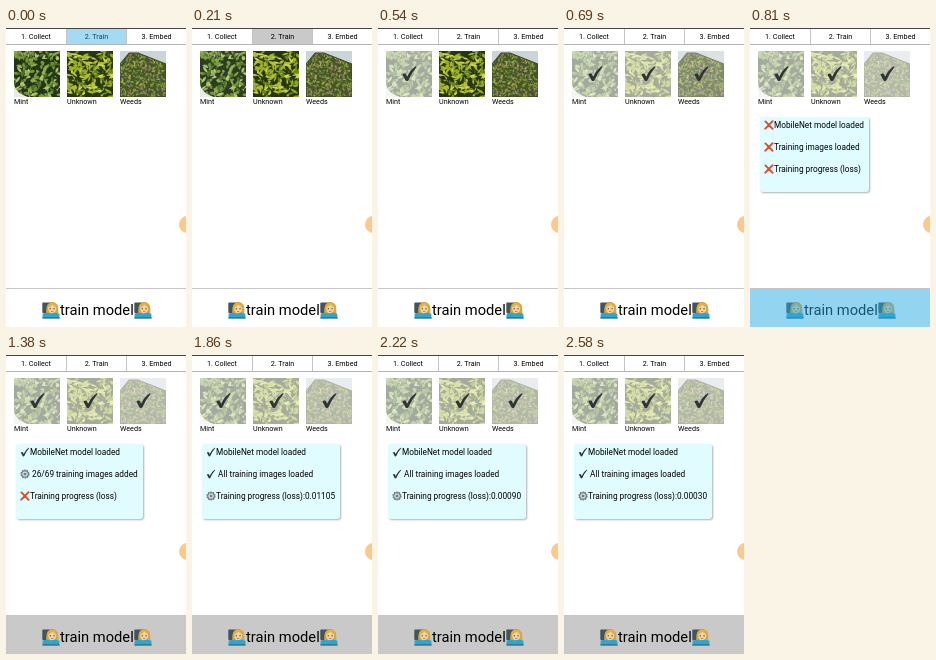
These frames come from a looping animation (180 by 299 pixels, 2610 ms). An HTML page with a canvas:

```html
<!DOCTYPE html>
<html lang="en">
<head>
<meta charset="utf-8">
<title>Train a model</title>
<style>
  @property --picked { syntax: '<number>'; inherits: true; initial-value: 0; }
  html, body { margin: 0; width: 100%; height: 100%; overflow: hidden; background: #fff; }
  body { position: relative; font: 7.2px Roboto, sans-serif; color: #000; }
  body > *, .thumb > *, .train > * { position: absolute; }
  .tabs { left: 0; top: 0; width: 180px; height: 15px; display: flex; border: solid #b4b4b4; border-width: 0 0 1px; border-top: 1px solid #444; }
  .tabs div { position: relative; width: 60px; box-sizing: border-box; line-height: 15px; text-align: center; }
  .tabs div + div { border-left: 1px solid #c4c4c4; }
  .tap { position: absolute; inset: 0; background: rgba(40, 170, 225, .42); }
  .thumb { top: 23px; width: 46px; height: 46px; }
  .thumb span { top: 46px; line-height: 9px; white-space: nowrap; }
  .veil { inset: 0; background: rgba(255, 255, 255, calc(.58 * var(--picked) * var(--picked))); }
  .veil svg { position: absolute; left: 15px; top: 14px; width: 17px; height: 17px; opacity: calc(1.8 * var(--picked)); }
  .panel { left: 10px; top: 89px; height: 75px; padding: 0 5px 0 4px; border-radius: 3px; background: #e0fcff; box-shadow: 1px 1px 2px #a9b4b6; font-size: 8.27px; }
  .row { display: flex; align-items: center; height: 22px; white-space: pre; }
  .row:first-child { margin-top: -3px; }
  .row svg { width: 10px; height: 10px; flex: none; }
  .train { left: 0; top: 260px; width: 180px; height: 38px; border-top: 1px solid #c6c6c6; overflow: hidden; font-size: 14.7px; line-height: 42px; }
  .train span { left: 54px; white-space: nowrap; }
  .train svg { top: 12px; width: 18px; height: 18px; }
  .train .tap { background: rgba(40, 170, 225, .5); }
  .bubble { left: 173px; top: 188px; width: 17px; height: 17px; border-radius: 50%; background: #fbc98c; }

  .tab-on { animation: tab 2610ms step-end infinite; }
  .tab-on .tap { animation: tab-tap 2610ms step-end infinite; }
  .train { animation: press 2610ms step-end infinite; }
  .train .tap { animation: press-tap 2610ms step-end infinite; }
  .panel { animation: show 2610ms step-end infinite; }
  .veil { animation: 2610ms linear infinite; }
  #mint .veil { animation-name: pick1; }
  #unknown .veil { animation-name: pick2; }
  #weeds .veil { animation-name: pick3; }
  @keyframes tab { 0% { background: #fff; } 6.9% { background: #c9c9c9; } 9.2%, 100% { background: #fff; } }
  @keyframes tab-tap { 0% { opacity: 1; } 6.9%, 100% { opacity: 0; } }
  @keyframes press { 0% { background: #fff; } 34.4%, 100% { background: #c9c9c9; } }
  @keyframes press-tap { 0% { opacity: 0; } 27.5% { opacity: 1; } 34.4%, 100% { opacity: 0; } }
  @keyframes show { 0% { visibility: hidden; } 28.7%, 100% { visibility: visible; } }
  @keyframes pick1 { 0%, 6.9% { --picked: 0; } 11.5%, 100% { --picked: 1; } }
  @keyframes pick2 { 0%, 20.9% { --picked: 0; } 24.5%, 100% { --picked: 1; } }
  @keyframes pick3 { 0%, 23.7% { --picked: 0; } 27.5%, 100% { --picked: 1; } }
</style>
</head>
<body>
<svg width="0" height="0">
  <symbol id="check" viewBox="0 0 10 10"><path d="M.8 5.6Q2 4.6 2.8 5.2L3.6 6.9Q5.6 2.8 8.6.8L9.3 1Q6.2 4.4 4.3 9.1Q3.4 9.8 2.8 9.2Z" fill="#303436"/></symbol>
  <symbol id="cross" viewBox="0 0 10 10"><path d="M1.4 1.4 8.6 8.8M8.6 1.2 1.3 8.7" stroke="#df4a2c" stroke-width="1.9" stroke-linecap="round"/></symbol>
  <symbol id="gear" viewBox="0 0 10 10">
    <g fill="none" stroke="#6d7478">
      <circle cx="5" cy="5" r="4" stroke-width="1.2" stroke-dasharray="1.5 1.01"/>
      <circle cx="5" cy="5" r="3.2" stroke-width="1.1"/>
      <path d="M5 2V8M2.4 3.5 7.6 6.5M7.6 3.5 2.4 6.5" stroke-width=".6"/>
    </g>
    <circle cx="5" cy="5" r="1.1" fill="#6d7478"/>
  </symbol>
  <symbol id="coder" viewBox="0 0 18 18">
    <rect x=".3" y="1.6" width="12" height="10.4" rx=".8" fill="#43545a"/>
    <path d="M4.2 12Q3.6 1 10.4 1T16.4 12Z" fill="#d9a53c"/>
    <ellipse cx="10.2" cy="7.6" rx="4" ry="4.7" fill="#f6d3a2"/>
    <path d="M6 6.6Q9 5.6 10.4 3.4Q11.4 5.6 14.4 6.4Q14.2 1.8 10 1.8T6 6.6Z" fill="#e0b04a"/>
    <path d="M7.6 7.8H9M11.4 7.8H12.8" stroke="#54402c" stroke-width="1"/>
    <path d="M9 10.2Q10.2 11 11.4 10.2" stroke="#a5562d" stroke-width=".7" fill="none"/>
    <path d="M.6 17.4V12.4Q4 11 9 12.2Q14 11 17.4 12.8V17.4Z" fill="#2ba6d4"/>
    <path d="M.4 16.2H17.6V17.5H.4Z" fill="#3f6c7d"/>
  </symbol>
</svg>

<div class="tabs"><div>1. Collect</div><div class="tab-on">2. Train<i class="tap"></i></div><div>3. Embed</div></div>

<div class="thumb" id="mint" style="left:8px"><canvas width="46" height="46"></canvas><div class="veil"><svg><use href="#check"/></svg></div><span>Mint</span></div>
<div class="thumb" id="unknown" style="left:61px"><canvas width="46" height="46"></canvas><div class="veil"><svg><use href="#check"/></svg></div><span>Unknown</span></div>
<div class="thumb" id="weeds" style="left:114px"><canvas width="46" height="46"></canvas><div class="veil"><svg><use href="#check"/></svg></div><span>Weeds</span></div>

<div class="panel">
  <div class="row"><svg><use/></svg><span></span></div>
  <div class="row"><svg><use/></svg><span></span></div>
  <div class="row"><svg><use/></svg><span></span></div>
</div>

<div class="bubble"></div>

<div class="train">
  <svg style="left:36px"><use href="#coder"/></svg><span>train model</span><svg style="left:128px"><use href="#coder"/></svg>
  <i class="tap"></i>
</div>

<script>
const LOOP = 2610, STEP = 30;
const start = performance.now();

function seeded(seed) {
  return () => (seed = (seed * 16807) % 2147483647) / 2147483647;
}

// Scatters pointed leaves over a dark ground.
function foliage(ctx, { seed, count, long, wide, ground, tones }) {
  const rnd = seeded(seed);
  ctx.fillStyle = ground;
  ctx.fillRect(0, 0, 46, 46);
  for (let i = 0; i < count; i++) {
    const l = long * (.6 + .6 * rnd()), w = wide * (.7 + .5 * rnd());
    ctx.save();
    ctx.translate(rnd() * 46, rnd() * 46);
    ctx.rotate(rnd() * Math.PI * 2);
    ctx.fillStyle = tones[Math.floor(rnd() * tones.length)];
    ctx.beginPath();
    ctx.moveTo(-l, 0);
    ctx.quadraticCurveTo(0, -w * 2, l, 0);
    ctx.quadraticCurveTo(0, w * 2, -l, 0);
    ctx.fill();
    ctx.restore();
  }
}

const pen = id => document.querySelector(`#${id} canvas`).getContext('2d');

const mint = pen('mint');
foliage(mint, {
  seed: 41, count: 210, long: 3.4, wide: 1.5, ground: '#22341a',
  tones: ['#6f9136', '#8fac4c', '#b0c46e', '#4f7028', '#263a18', '#7a9a3e']
});
mint.fillStyle = '#e6eadf';
mint.beginPath();
mint.moveTo(0, 34);
mint.quadraticCurveTo(3, 43, 14, 46);
mint.lineTo(0, 46);
mint.fill();

foliage(pen('unknown'), {
  seed: 77, count: 200, long: 4, wide: 1.2, ground: '#26360f',
  tones: ['#b3bf30', '#93a826', '#d0d65a', '#6c8620', '#2c3e10', '#a2b42c']
});

const bed = pen('weeds');
const outline = new Path2D('M0 46V13L9 2H18L46 13V46Z');
bed.fillStyle = '#cbd5d9';
bed.fillRect(0, 0, 46, 46);
bed.save();
bed.clip(outline);
foliage(bed, {
  seed: 19, count: 420, long: 2.1, wide: .75, ground: '#46562a',
  tones: ['#7f9636', '#a0b644', '#667d2c', '#95785a', '#8f8068', '#47582a', '#8ca53a']
});
bed.restore();
bed.strokeStyle = '#3b4723';
bed.stroke(outline);

const rows = [...document.querySelectorAll('.row')].map(el => ({
  icon: el.querySelector('use'), text: el.querySelector('span')
}));

function setRow(i, icon, text) {
  rows[i].icon.setAttribute('href', '#' + icon);
  rows[i].text.textContent = text;
}

function imagesRow(t) {
  if (t < 1170) return ['cross', 'Training images loaded'];
  const n = Math.round((t - 1170) / 210 * 26);
  return n < 69 ? ['gear', ` ${n}/69 training images added`] : ['check', ' All training images loaded'];
}

function lossRow(t) {
  const label = 'Training progress (loss)';
  if (t < 1740) return ['cross', label];
  const loss = .01105 * Math.pow(150 / (t - 1710), 2.05);
  return ['gear', `${label}:${loss.toFixed(5)}`];
}

let last = -1;
function draw() {
  const t = Math.floor(((performance.now() - start) % LOOP + 5) / STEP) * STEP;
  if (t !== last) {
    last = t;
    setRow(0, t < 1080 ? 'cross' : 'check', 'MobileNet model loaded');
    setRow(1, ...imagesRow(t));
    setRow(2, ...lossRow(t));
  }
  requestAnimationFrame(draw);
}
draw();
</script>
</body>
</html>
```
